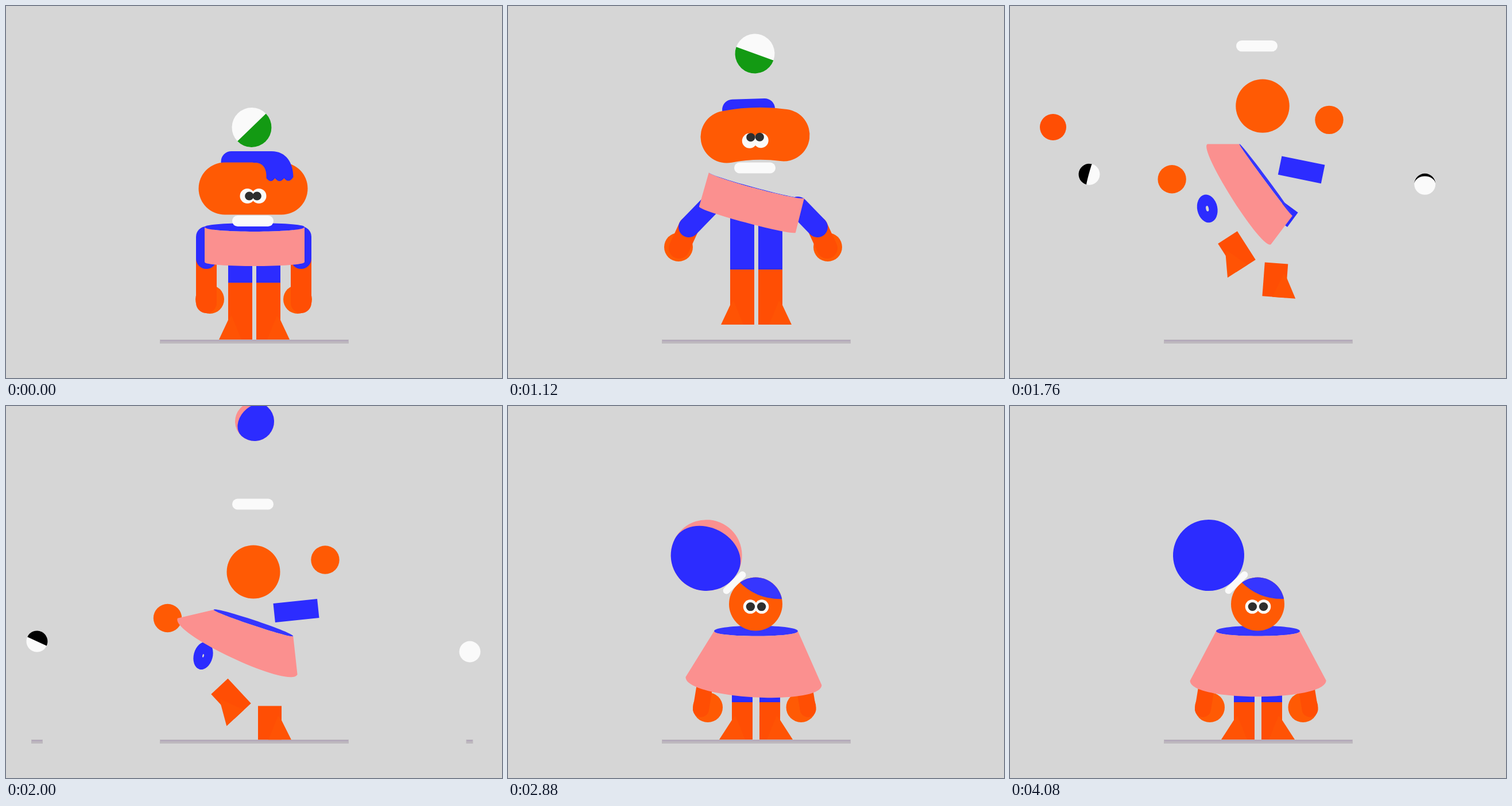
An HTML page with a canvas that plays this animation: 864x648 px, repeating every 4160 ms.

```html
<!DOCTYPE html>
<html lang="en">
<head>
<meta charset="utf-8">
<title>Character swap</title>
<style>
html, body { margin: 0; width: 100%; height: 100%; overflow: hidden; background: #d6d6d6; }
canvas { display: block; width: 864px; height: 648px; }
</style>
</head>
<body>
<canvas id="stage" width="864" height="648"></canvas>
<script>
const c = document.getElementById('stage').getContext('2d');
const LOOP = 4160, STEP = 80, FLOOR = 581;
const JUMP = 960, BURST = 1200, AIR = 1440, FALL = 2000, LAND = 2160, SQUASH = 2320;
const GRAVITY = .0006;
const BG = '#d6d6d6', BLUE = '#2c2cff', BLUE2 = '#3636ff', ORANGE = '#ff5a04', DEEP = '#ff4e04',
  PINK = '#fb908f', WHITE = '#fafafa', GREEN = '#139a13', DARK = '#2e2e2e';

const rad = d => d * Math.PI / 180;
const clamp = u => Math.max(0, Math.min(1, u));
const ease = (t, from, to) => { const u = clamp((t - from) / (to - from)); return u * u * (3 - 2 * u); };
const lerp = (a, b, u) => a + (b - a) * u;
const mix = (a, b, u) => a.map((v, i) => lerp(v, b[i], u));
const mixPose = (a, b, u) =>
  Object.fromEntries(Object.keys(a).map(k => [k, mix(a[k], b[k], u)]));

// ball: x, y, rx, ry, turn, bulge     wide: both ends, sag, fringe
// gaze: dx, dy, pupil inset, look     tie: x, y, turn, length, width
// cape: x, y, turn, half top, left hem x y, right hem x y, front, back, hem bow
// arm: shoulder, elbow, wrist, hand   stand: leg length, lift, mirror axis
const tall = {
  ball: [428, 211.5, 34.5, 34.5, -44, 0],
  wide: [381, 318, 480, 318, 0, 1],
  gaze: [0, 13, 3, 0],
  tie: [430, 374.5, 0, 53, 19],
  cape: [433, 385, 0, 87, -87, 61, 87, 61, 8, 7, 7],
  arm: [349, 402, 349, 440, 349, 517, 355, 511],
  stand: [99, 0, 431.5]
};
const crouch = {
  ball: [427, 261, 34.5, 34.5, -36, .4],
  wide: [379, 371, 476, 361, 5, 0],
  gaze: [-1, 3, 3, -5.5],
  tie: [430, 425.5, 0, 53, 19],
  cape: [433, 430, 0, 83, -92, 58, 90, 58, 6, -6, 7],
  arm: [350, 450, 327, 478, 337, 529, 339, 522],
  stand: [66, 0, 433]
};
const leap = {
  ball: [430, 83, 34.5, 34.5, 20, 0],
  wide: [381, 228, 480, 225, -4, 0],
  gaze: [0, 8, 2, -6],
  tie: [430, 282, 0, 53, 19],
  cape: [433, 312, 15, 86, -87, 62, 87, 62, 6, -5, 6],
  arm: [349, 350, 315, 385, 298, 422, 297, 420],
  stand: [96, 26, 427]
};

// head: x, y, rx, ry, eye dy, pupil dy, pupil ry     boot: x, y, turn, w, h
const airborne = {
  ball: [432, -250, 34, 34, -20, -.9],
  head: [452, 128.5, 47, 47, 4, 0, 7.5],
  tie: [430, 42, 0, 52, 20],
  cape: [465.5, 310, 100, 84, -88, 59, 88, 59, 0, .5, 4],
  handL: [283, 319], handR: [556, 213],
  bootL: [399, 426, -19, 40, 59], bootR: [465, 485.5, 10, 40, 59]
};
const falling = {
  ball: [433, 27, 34, 34, -48, -.75],
  head: [431, 289, 46.5, 46.5, 4, 0, 7.5],
  tie: [430, 171, 0, 53, 19],
  cape: [431, 378, 18.4, 73, -128, 34, 101, 61, 4, 5, 22],
  handL: [281.5, 369.5], handR: [556, 268],
  bootL: [392, 510, -43, 40, 59], bootR: [459.5, 552, 0, 41, 59]
};
const squashed = {
  ball: [353, 368, 39, 31, -80, -.3],
  head: [431, 411, 46.5, 36, 15.5, 4, 5],
  tie: [386.5, 390, -50, 31, 12],
  cape: [432.5, 441, -12.6, 73, -107, 105, 126, 63, 10, 10, 30],
  handL: [386, 530], handR: [546, 514],
  bootL: [406, 551, 0, 36, 60], bootR: [482, 563, 52, 36, 56]
};
const settled = {
  ball: [346, 260, 62, 62, 0, 0],
  head: [431.5, 345, 46.5, 46.5, 4.5, 0, 7.5],
  tie: [394.5, 307.7, -44.5, 39, 12],
  cape: [432, 392.3, 0, 73, -118.5, 86, 118.5, 86, 8.5, 9.5, 28],
  handL: [348, 525], handR: [510.5, 525],
  bootL: [408, 548.5, 0, 36, 65], bootR: [456, 548.5, 0, 36, 65]
};

// Free fall through two known states; everything but the place stays between them.
function fly(a, b, t) {
  const u = (t - AIR) / (FALL - AIR), out = mix(a, b, clamp(u));
  out[0] = lerp(a[0], b[0], u);
  out[1] = lerp(a[1], b[1], u) + GRAVITY * (t - AIR) * (t - FALL);
  return out;
}
function firstPose(t) {
  const low = mixPose(tall, crouch, ease(t, 440, 800));
  const rise = Math.min(1.7, Math.max(0, (t - JUMP) / 160) ** 1.2);
  return mixPose(low, leap, rise);
}
// The first character's parts under the names the flight uses.
function launchPose(p) {
  const [, , x, y] = p.wide, [len, lift, axis] = p.stand, [hx, hy] = p.arm.slice(6);
  const foot = FLOOR - len / 2 - lift;
  return {
    ball: p.ball, tie: p.tie, cape: p.cape,
    head: [x - 5, y, 47, 47, 4, 0, 7.5],
    handL: [hx, hy], handR: [2 * axis - hx, hy],
    bootL: [408, foot, 0, 42, len], bootR: [457, foot, 0, 42, len]
  };
}
const bounce = t => t < SQUASH ? 1 : Math.exp((SQUASH - t) / 90) * Math.cos((t - SQUASH) * Math.PI / 240);
function lastPose(t) {
  const u = Math.max(0, t - SQUASH), p = mixPose(settled, squashed, bounce(t));
  const spin = 1 - (1 - clamp(u / 1760)) ** 3;
  p.ball[0] -= 90 * Math.exp(-u / 110) * Math.sin(u * Math.PI / 250);
  p.ball[4] = lerp(-80, 77, spin);
  p.ball[5] = lerp(-.3, -1, spin);
  const swing = 28 * Math.exp(-u / 450) * Math.sin(u * Math.PI / 224);
  p.cape[4] -= swing / 2;
  p.cape[5] -= swing * .8;
  p.cape[6] -= swing / 2;
  p.cape[7] += swing;
  return p;
}
function flightPose(t) {
  const free = Object.fromEntries(Object.keys(airborne).map(k => [k, fly(airborne[k], falling[k], t)]));
  if (t < AIR) return mixPose(launchPose(firstPose(t)), free, ease(t, 1120, AIR));
  return mixPose(free, squashed, ease(t, FALL, 2280));
}

function blob(x, y, rx, ry, fill, turn = 0) {
  c.fillStyle = fill;
  c.beginPath();
  c.ellipse(x, y, rx, ry, turn, 0, 7);
  c.fill();
}
function shape(pts, fill) {
  c.fillStyle = fill;
  c.beginPath();
  for (let i = 0; i < pts.length; i += 2) c.lineTo(pts[i], pts[i + 1]);
  c.fill();
}
function pill(x1, y1, x2, y2, w, color, sag = 0) {
  c.strokeStyle = color;
  c.lineWidth = w;
  c.lineCap = 'round';
  c.beginPath();
  c.moveTo(x1, y1);
  c.quadraticCurveTo((x1 + x2) / 2, (y1 + y2) / 2 + sag * 2, x2, y2);
  c.stroke();
}
function place(x, y, deg, paint) {
  c.save();
  c.translate(x, y);
  c.rotate(rad(deg));
  paint();
  c.restore();
}
// Two-tone ball; bulge moves the seam from the middle to either edge.
function globe([x, y, rx, ry, deg, bulge], base, cap) {
  c.save();
  c.translate(x, y);
  c.scale(rx, ry);
  c.rotate(rad(deg));
  if (bulge > -.995) blob(0, 0, 1, 1, base);
  c.fillStyle = cap;
  c.beginPath();
  c.arc(0, 0, 1, 0, Math.PI);
  c.ellipse(0, 0, 1, Math.abs(bulge), 0, Math.PI, bulge > 0 ? 0 : 2 * Math.PI, bulge > 0);
  c.fill();
  c.restore();
}
// Arched edge; a positive depth bows to the right-hand side of the direction.
function bow(x1, y1, x2, y2, depth) {
  const k = depth * 4 / 3 / Math.hypot(x2 - x1, y2 - y1);
  const nx = (y1 - y2) * k, ny = (x2 - x1) * k;
  c.bezierCurveTo(x1 + nx, y1 + ny, x2 + nx, y2 + ny, x2, y2);
}
function drawCape([x, y, turn, w, lx, ly, rx, ry, front, back, hem], lining) {
  place(x, y, turn, () => {
    c.fillStyle = lining;
    c.beginPath();
    c.moveTo(-w, 0);
    bow(-w, 0, w, 0, -back);
    bow(w, 0, -w, 0, -front);
    c.fill();
    c.fillStyle = PINK;
    c.beginPath();
    c.moveTo(-w, 0);
    bow(-w, 0, w, 0, front);
    c.lineTo(rx, ry);
    bow(rx, ry, lx, ly, -hem);
    c.fill();
  });
}
function boot([x, y, turn, w, h], side) {
  place(x, y, turn, () => {
    c.scale(side, 1);
    c.fillStyle = DEEP;
    c.fillRect(-w / 2, -h / 2, w, h);
    const e = w / 2, b = h / 2;
    shape([58 - e, b, e, b - 34, e - 6, b - 42, e - 23, b], '#ff5304');
  });
}
function brick([x, y, w, h, turn]) {
  place(x, y, turn, () => shape([-w / 2, -h / 2, w / 2, -h / 2, w / 2, h / 2, -w / 2, h / 2], BLUE));
}
function leg([x, y, , w, h], top) {
  c.fillStyle = BLUE;
  c.fillRect(x - w / 2, top, w, Math.max(0, y - h / 2 - top + 1));
}
function drawTie([x, y, turn, len, w]) {
  place(x, y, turn, () => pill(-len / 2, 0, len / 2, 0, w, WHITE));
}
function arm([sx, sy, ex, ey, wx, wy, hx, hy]) {
  blob(hx, hy, 25, 25, ORANGE);
  pill(ex, ey, wx, wy, 36, DEEP);
  pill(sx, sy, ex, ey, 36, BLUE);
}
function capeArm([x, y], side) {
  blob(x, y, 26, 26, ORANGE);
  pill(x + side * 5, y - 40, x + side * 12, y + 3, 28, DEEP);
}
function eyes(x, y, r, pupilGap, look, pupilRy) {
  for (const s of [-1, 1]) blob(x + s * 10, y, r, r - (7.5 - pupilRy), WHITE);
  for (const s of [-1, 1]) blob(x + s * pupilGap, y + look, 7.7, pupilRy, DARK);
}
function strip(x, w) {
  c.fillStyle = '#bdb8be';
  c.fillRect(x - w / 2, FLOOR, w, 7);
  c.fillStyle = '#b3a7ba';
  c.fillRect(x - w / 2 + 1, FLOOR + 1, w - 2, 2);
}
function onFloor(paint) {
  c.save();
  c.beginPath();
  c.rect(0, 0, 864, FLOOR + .5);
  c.clip();
  paint();
  c.restore();
}

function wideHead([x1, y1, x2, y2, sag, fringe], [dx, dy, inset, look]) {
  const x = (x1 + x2) / 2, y = (y1 + y2) / 2;
  const tilt = Math.atan2(y2 - y1, x2 - x1) * 180 / Math.PI;
  place(x, y, tilt, () => {
    c.fillStyle = BLUE;
    c.beginPath();
    c.roundRect(-56, -65, 92, 40, [18, 18, 4, 4]);
    c.fill();
  });
  pill(x1, y1, x2, y2, 91, ORANGE, sag);
  place(x, y, tilt, () => {
    if (fringe > .02) {
      const X = v => v * (.5 + .5 * fringe), Y = v => -65 + (v + 65) * (.4 + .6 * fringe);
      c.fillStyle = BLUE;
      c.beginPath();
      c.moveTo(0, -65);
      c.lineTo(X(32), -65);
      c.bezierCurveTo(X(58), -65, X(70), Y(-44), X(70), Y(-20));
      for (const p of [54, 38, 23]) c.quadraticCurveTo(X(p + 8), Y(-8), X(p), Y(-18));
      c.bezierCurveTo(X(24), Y(-36), X(16), Y(-45), X(4), Y(-45));
      c.lineTo(0, Y(-45));
      c.fill();
    }
    eyes(dx, dy, 13, 9.7 - inset, look, 7.5);
  });
}
function roundHead([x, y, rx, ry, eyeDy, look, pupilRy], face) {
  blob(x, y, rx, ry, ORANGE);
  if (!face) return;
  const dip = look * 4;
  c.save();
  c.translate(x, y);
  c.scale(rx / 46.5, ry / 46.5);
  c.beginPath();
  c.arc(0, 0, 46.5, 0, 7);
  c.clip();
  c.fillStyle = BLUE2;
  c.beginPath();
  c.moveTo(-29, -39);
  c.quadraticCurveTo(2, -7 + dip * .5, 48, -9 + dip);
  c.lineTo(48, -50);
  c.lineTo(-29, -50);
  c.fill();
  c.restore();
  eyes(x + .5, y + eyeDy, 12.3, 9.6, look, pupilRy);
}

function drawFirst(t) {
  const p = firstPose(t), { bootL, bootR } = launchPose(p), axis = p.stand[2];
  onFloor(() => {
    for (const [b, side] of [[bootL, -1], [bootR, 1]]) {
      leg(b, p.cape[1] + p.cape[5] - 8);
      boot(b, side);
    }
  });
  arm(p.arm);
  arm(p.arm.map((v, i) => i % 2 ? v : 2 * axis - v));
  drawCape(p.cape, BLUE);
  drawTie(p.tie);
  wideHead(p.wide, p.gaze);
  globe(p.ball, WHITE, GREEN);
}
function drawLooseParts(t) {
  brick(fly([519.5, 388, 33, 33, -25], [450, 425, 30, 30, -75], t));
  brick(fly([510.5, 298, 76, 33, 35], [505.5, 356.5, 77, 33, -6], t));
  const [x, y, rx, ry, turn, hole] = fly([344, 351, 25, 19, 42, .3], [343.5, 435, 24.5, 16.5, 105, .12], t);
  blob(x, y, rx, ry, BLUE, rad(turn));
  blob(x, y, rx * hole, ry * hole * .7, BG, rad(turn));
  const [sx, sy] = fly([215, 160], [-30, 330], t);
  blob(sx, sy, 23, 23, DEEP);
}
function drawFlyingEyes(t) {
  globe(fly([250, 245, 18.5, 18.5, -28, .1], [54, 410, 18.5, 18.5, 205, 0], t), WHITE, '#000');
  globe(fly([609, 261, 18.5, 18.5, 180, .4], [808, 428, 18.5, 18.5, 180, 1], t), WHITE, '#000');
  for (const [x, from] of [[54, 1840], [807.5, 1904]]) {
    if (t > from) strip(x, (t - from) / 8);
  }
}
function drawSecond(t) {
  const landed = t >= LAND, p = t < SQUASH ? flightPose(t) : lastPose(t);
  onFloor(() => {
    for (const [b, side] of [[p.bootL, -1], [p.bootR, 1]]) {
      if (t > SQUASH) leg(b, p.cape[1] + 80);
      boot(b, side);
    }
    if (landed && bounce(t) > .6) {
      blob(499, 547, 21, 21, DEEP);
      shape([472, 542, 514, 518, 487, 556], BLUE);
    }
  });
  if (landed) {
    capeArm(p.handL, -1);
    capeArm(p.handR, 1);
  } else {
    drawLooseParts(t);
    for (const [x, y] of [p.handL, p.handR]) blob(x, y, 24.7, 24.7, ORANGE);
  }
  drawCape(p.cape, BLUE2);
  roundHead(p.head, landed);
  if (t < AIR) globe(p.ball, WHITE, GREEN);
  else globe(p.ball, PINK, BLUE);
  drawTie(p.tie);
  if (t < SQUASH) drawFlyingEyes(t);
}
function draw(t) {
  c.fillStyle = BG;
  c.fillRect(0, 0, 864, 648);
  strip(432.5, 329);
  if (t < BURST) drawFirst(t);
  else drawSecond(t);
}

const start = performance.now();
function tick() {
  const t = (performance.now() - start) % LOOP;
  draw(Math.floor(t / STEP) * STEP);
  requestAnimationFrame(tick);
}
tick();
</script>
</body>
</html>
```
